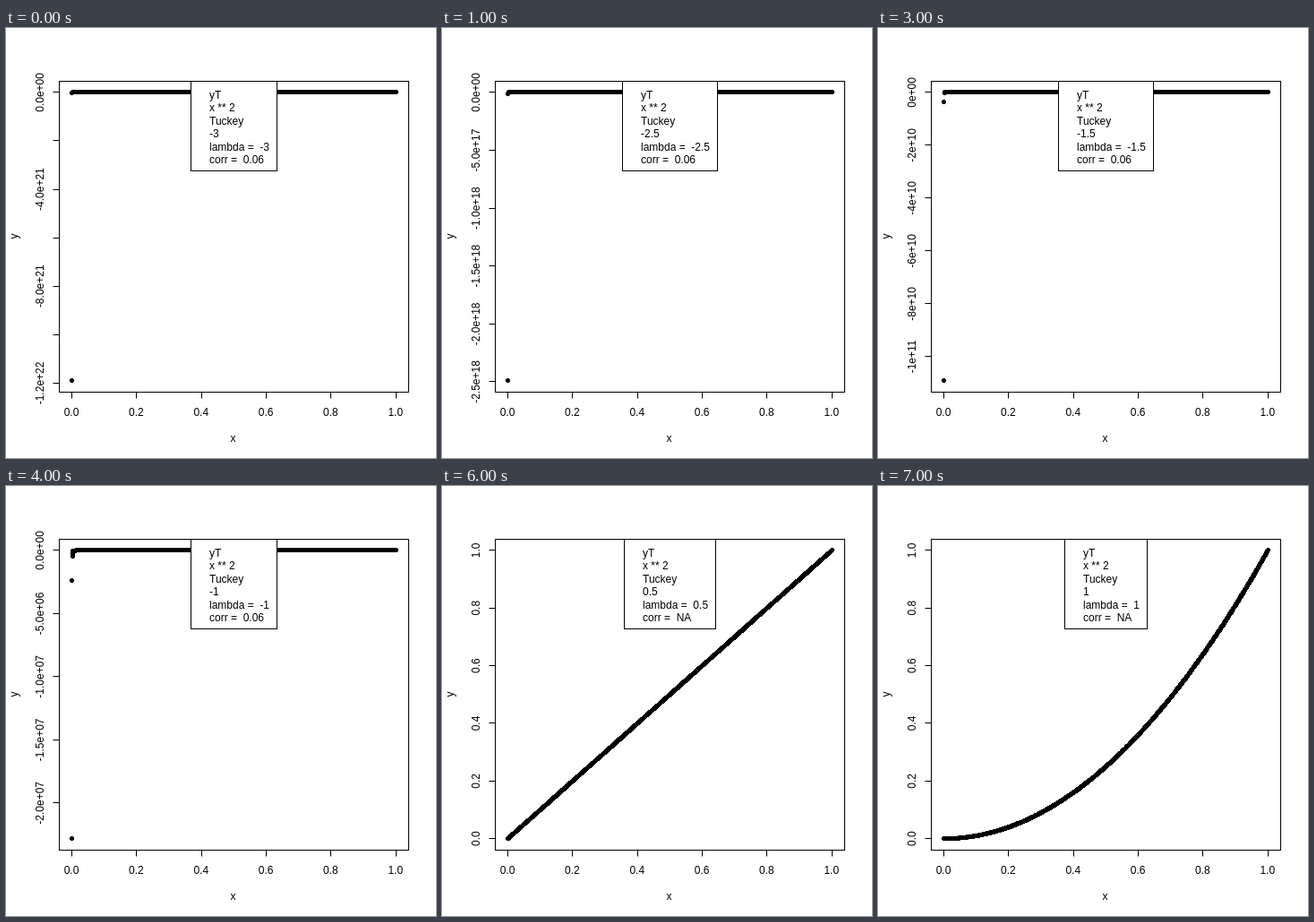
Write an HTML page with a canvas that moves like this. It is 480 px wide and 480 px high and loops after 8000 ms.

```html
<!DOCTYPE html>
<html lang="en">
<head>
<meta charset="utf-8">
<style>
  html, body { margin: 0; width: 100%; height: 100%; overflow: hidden; background: #fff; }
  canvas { display: block; width: 480px; height: 480px; }
</style>
</head>
<body>
<canvas id="stage" width="480" height="480"></canvas>
<script>
const ctx = document.getElementById('stage').getContext('2d');
const STEP_MS = 1000;
const BOX = { left: 59, top: 59, right: 449, bottom: 406 };
const X0 = 73.51, X_SPAN = 361.78;
const Y_TOP = 71.91, Y_SPAN = 321.78;

// One entry per power; exp = decimals in scientific labels, fixed = plain decimals.
const steps = [
  { lambda: -3,   corr: '0.06', tick: 2e21, exp: 1 },
  { lambda: -2.5, corr: '0.06', tick: 5e17, exp: 1 },
  { lambda: -2,   corr: '0.06', tick: 1e14, exp: 0 },
  { lambda: -1.5, corr: '0.06', tick: 2e10, exp: 0 },
  { lambda: -1,   corr: '0.06', tick: 5e6,  exp: 1 },
  { lambda: -0.5, corr: '0.12', tick: 1000, fixed: 0 },
  { lambda: 0.5,  corr: 'NA',   tick: 0.2,  fixed: 1 },
  { lambda: 1,    corr: 'NA',   tick: 0.2,  fixed: 1 }
];

// The smallest samples dominate negative powers; the rest fill [0, 1] evenly.
const samples = [4778, 1550, 690, 475, 440, 350, 260, 200].map(v => 1 / v);
for (let i = 6; i <= 1000; i++) samples.push(i / 1000);

const transform = (x, lambda) => Math.sign(lambda) * x ** (2 * lambda);

function line(x1, y1, x2, y2) {
  ctx.beginPath();
  ctx.moveTo(x1 + 0.5, y1 + 0.5);
  ctx.lineTo(x2 + 0.5, y2 + 0.5);
  ctx.stroke();
}

function frame(left, top, right, bottom) {
  ctx.strokeRect(left + 0.5, top + 0.5, right - left, bottom - top);
}

function dot(px, py) {
  const x = Math.floor(px), y = Math.floor(py);
  ctx.fillRect(x - 1, y - 2, 3, 5);
  ctx.fillRect(x - 2, y - 1, 5, 3);
}

function centred(text, x, y, vertical) {
  ctx.save();
  ctx.translate(x, y);
  if (vertical) ctx.rotate(-Math.PI / 2);
  ctx.textAlign = 'center';
  ctx.fillText(text, 0, 0);
  ctx.restore();
}

function label(value, step) {
  if (step.exp === undefined) return value.toFixed(step.fixed);
  return value.toExponential(step.exp).replace(/\+(\d)$/, '+0$1');
}

function xAxis() {
  for (let i = 0; i <= 5; i++) {
    const x = X0 + X_SPAN * i / 5;
    line(Math.floor(x), BOX.bottom, Math.floor(x), BOX.bottom + 7);
    centred((i / 5).toFixed(1), x - 0.5, 433);
  }
  centred('x', 253.5, 462);
}

function yAxis(step, low, toY) {
  const sign = Math.sign(step.lambda);
  const limit = (sign < 0 ? -low : 1) + step.tick * 0.001;
  const reach = Math.abs(toY(BOX.bottom, true));
  let lastY = Infinity;
  const count = Math.floor(Math.max(limit, sign < 0 ? reach : 0) / step.tick);
  const values = Array.from({ length: count + 1 }, (_, i) => i ? sign * i * step.tick : 0);
  for (const value of values.sort((a, b) => a - b)) {
    const y = toY(value);
    line(BOX.left - 7, Math.floor(y), BOX.left, Math.floor(y));
    const text = label(value, step);
    if (lastY - y < ctx.measureText(text).width + 9) continue;
    centred(text, 42, y, true);
    lastY = y;
  }
  centred('y', 13, 232.5, true);
}

function legend({ lambda, corr }) {
  const rows = ['yT', 'x ** 2', 'Tuckey', String(lambda),
    'lambda =  ' + lambda, 'corr =  ' + corr];
  const half = (Math.round(ctx.measureText(rows[4]).width) + 29) / 2;
  const left = Math.floor(254.4 - half), right = Math.floor(254.4 + half);
  ctx.fillStyle = '#fff';
  ctx.fillRect(left, BOX.top, right - left, 100);
  ctx.fillStyle = '#000';
  frame(left, BOX.top, right, 159);
  rows.forEach((row, i) => ctx.fillText(row, left + 21, Math.round(79 + i * 14.4)));
}

function draw(step) {
  const negative = step.lambda < 0;
  const low = negative ? transform(samples[0], step.lambda) : 0;
  const high = negative ? -1 : 1;
  const toY = (v, inverse) => inverse
    ? high - (v - Y_TOP) / Y_SPAN * (high - low)
    : Y_TOP + (high - v) / (high - low) * Y_SPAN;

  ctx.fillStyle = '#fff';
  ctx.fillRect(0, 0, 480, 480);
  ctx.fillStyle = ctx.strokeStyle = '#000';
  ctx.lineWidth = 1;
  ctx.font = '12px "Liberation Sans", Arial, sans-serif';

  for (const x of samples) dot(X0 + x * X_SPAN, toY(transform(x, step.lambda)));
  frame(BOX.left, BOX.top, BOX.right, BOX.bottom);
  xAxis();
  yAxis(step, low, toY);
  legend(step);
}

let shown = -1;
function tick(now) {
  const index = Math.floor(now / STEP_MS) % steps.length;
  if (index !== shown) draw(steps[shown = index]);
  requestAnimationFrame(tick);
}
tick(performance.now());
</script>
</body>
</html>
```
